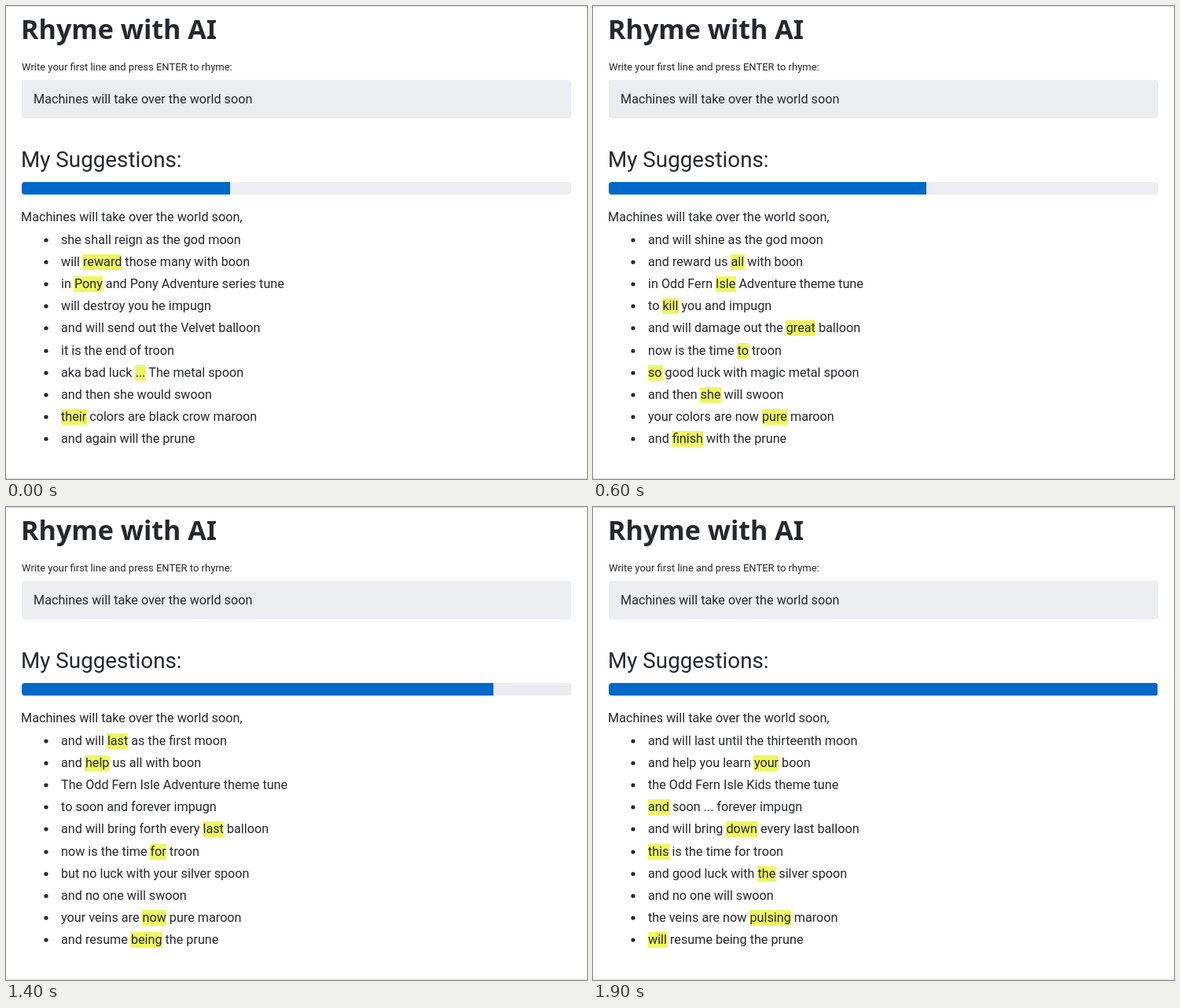
Recreate the animation shown at these times as an HTML page with a canvas. Size 739x602 px, loop 2000 ms.

```html
<!DOCTYPE html>
<html lang="en">
<head>
<meta charset="utf-8">
<title>Rhyme with AI</title>
<style>
  html, body { margin: 0; width: 100%; height: 100%; overflow: hidden; background: #fff; }
  canvas { display: block; }
</style>
</head>
<body>
<canvas id="stage" width="739" height="602"></canvas>
<script>
const ctx = document.getElementById('stage').getContext('2d');

const STEP = 100, STEPS = 20;
const INK = '#262730', PANEL = '#ecedf0', BLUE = '#0068c9', MARK = '#eef761';
const BODY = '16.2px Roboto, sans-serif';
const LINE = 'Machines will take over the world soon';

// Key steps: progress in percent, and each verse with its fresh word starred.
const KEYS = [0, 3, 6, 9, 12, 17, 19];
const PERCENT = [38, 50, 58, 70, 79, 97, 100];
const VERSES = [
  ['she shall reign as the god moon', 'she will shine as the god moon',
   'and will shine as the god moon', '... will *rise as the first moon',
   '... will *rule as the first moon', 'and will last until the *thirteenth moon',
   'and will last until the thirteenth moon'],
  ['will *reward those many with boon', 'and *reward those many with boon',
   'and reward us *all with boon', 'and blessed us all with boon',
   'and *reward us all with boon', 'and help you *learn with boon',
   'and help you learn *your boon'],
  ['in *Pony and Pony Adventure series tune', 'in Pony Fern Pony Adventure *theme tune',
   'in Odd Fern *Isle Adventure theme tune', 'in Odd Fern Isle Adventure theme tune',
   'The Odd Fern Isle Adventure theme tune', 'the Odd Fern Isle *Kids theme tune',
   'the Odd Fern Isle Kids theme tune'],
  ['will destroy you he impugn', 'and destroy you *and impugn',
   'to *kill you and impugn', 'to *rape you like impugn',
   'to *quickly and forever impugn', 'very soon *... forever impugn',
   '*and soon ... forever impugn'],
  ['and will send out the Velvet balloon', 'and will bring out the Velvet balloon',
   'and will damage out the *great balloon', 'and will bring out the *worldwide balloon',
   'and will bring *forth the worldwide balloon', 'and will bring *back every last balloon',
   'and will bring *down every last balloon'],
  ['it is the end of troon', 'this is the time for troon',
   'now is the time *to troon', 'now is the time to troon',
   'now is the time to troon', 'now is the time for troon',
   '*this is the time for troon'],
  ['aka bad luck *... The metal spoon', 'bring bad luck *with magic metal spoon',
   '*so good luck with magic metal spoon', '*but bad luck with magic silver spoon',
   'but no luck with that silver spoon', 'and good luck with your silver spoon',
   'and good luck with *the silver spoon'],
  ['and then she would swoon', 'and then she will swoon',
   'and then *she will swoon', 'and then *all will swoon',
   'and no one will swoon', 'and no one will swoon',
   'and no one will swoon'],
  ['*their colors are black crow maroon', 'your colors are *now crow maroon',
   'your colors are now *pure maroon', 'your colors are now pure maroon',
   'your colors are *burning pure maroon', '*the veins are now pure maroon',
   'the veins are now *pulsing maroon'],
  ['and again will the prune', 'and *perhaps with the prune',
   'and *finish with the prune', 'and *stop being the prune',
   'and resume *training the prune', '*and resume being the prune',
   '*will resume being the prune']
].map(row => row.map(verse => verse.split(' ').map(word => ({
  text: word.replace('*', ''), fresh: word[0] === '*'
}))));

function keyAt(step) {
  let k = 0;
  while (k + 1 < KEYS.length && KEYS[k + 1] <= step) k++;
  return k;
}

function percentAt(step) {
  const k = keyAt(step);
  if (KEYS[k] === step) return PERCENT[k];
  const part = (step - KEYS[k]) / (KEYS[k + 1] - KEYS[k]);
  return Math.round(PERCENT[k] + part * (PERCENT[k + 1] - PERCENT[k]));
}

// Between two keys, pending word swaps are dealt out over the steps in turn.
function verseAt(row, step) {
  const k = keyAt(step), from = VERSES[row][k];
  if (KEYS[k] === step) return from;
  const to = VERSES[row][k + 1];
  const slots = KEYS[k + 1] - KEYS[k] - 1;
  const now = step - KEYS[k];
  let swaps = 0;
  return from.map((word, i) => {
    const next = to[i];
    if (next.fresh || next.text === word.text) return { text: word.text, fresh: false };
    const due = 1 + (swaps++ + row) % slots;
    return { text: now >= due ? next.text : word.text, fresh: now === due };
  });
}

function text(str, x, y, font) {
  ctx.font = font;
  ctx.fillStyle = INK;
  ctx.fillText(str, x, y);
}

function box(x, y, w, h, color) {
  ctx.fillStyle = color;
  ctx.fillRect(x, y, w, h);
}

function panel(x, y, w, h) {
  ctx.beginPath();
  ctx.roundRect(x, y, w, h, 4);
  ctx.fillStyle = PANEL;
  ctx.fill();
}

function drawProgress(percent) {
  ctx.save();
  panel(20, 224, 699, 16);
  ctx.clip();
  box(20, 224, Math.floor(6.98 * percent), 16, BLUE);
  ctx.restore();
}

function drawVerse(words, y) {
  ctx.beginPath();
  ctx.arc(51, y - 5, 2.6, 0, 2 * Math.PI);
  ctx.fillStyle = INK;
  ctx.fill();
  ctx.font = BODY;
  const gap = ctx.measureText(' ').width;
  let x = 70;
  for (const word of words) {
    const w = ctx.measureText(word.text).width;
    if (word.fresh) box(Math.round(x - 0.5), y - 15, Math.round(w + 1), 20, MARK);
    text(word.text, x, y, BODY);
    x += w + gap;
  }
}

function draw(step) {
  box(0, 0, 739, 602, '#fff');
  box(0, 0, 739, 1, '#dcdcdc');
  box(0, 601, 739, 1, '#dcdcdc');

  text('Rhyme with AI', 19, 42, 'bold 34.1px "Noto Sans", sans-serif');
  text('Write your first line and press ENTER to rhyme:', 20, 82, '13px Roboto, sans-serif');
  panel(20, 94, 699, 49);
  text(LINE, 35, 124, BODY);
  text('My Suggestions:', 19, 205, '27.8px Roboto, sans-serif');
  drawProgress(percentAt(step));
  text(LINE + ',', 19, 274, BODY);
  VERSES.forEach((_, row) => drawVerse(verseAt(row, step), Math.round(303 + row * 28.11)));
}

const start = performance.now();
function tick() {
  const elapsed = Math.max(0, performance.now() - start);
  draw(Math.floor(elapsed / STEP) % STEPS);
  requestAnimationFrame(tick);
}
tick();
</script>
</body>
</html>
```
